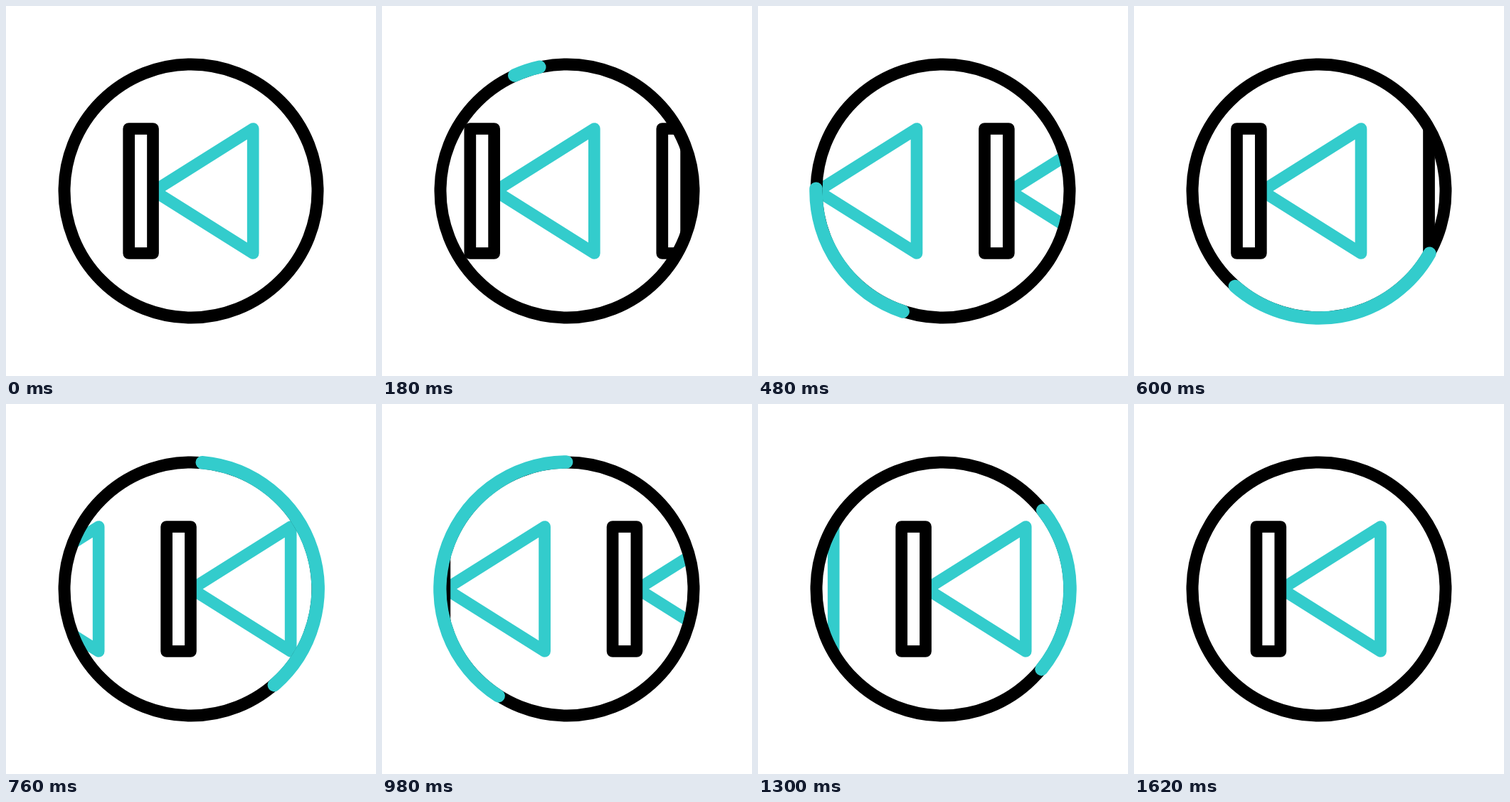
Recreate the animation shown at these times as an HTML page. Size 520x520 px, loop 2.42 s.

```html
<!DOCTYPE html>
<html lang="en">
<head>
<meta charset="utf-8">
<title>Previous track</title>
<style>
  html, body { margin: 0; width: 100%; height: 100%; overflow: hidden; background: #fff; }
  svg { display: block; width: 100%; height: 100%; }
</style>
</head>
<body>
<svg viewBox="0 0 520 520" fill="none" stroke-width="16.7" stroke-linejoin="round" stroke-linecap="round">
  <defs>
    <clipPath id="disc"><circle cx="260" cy="260" r="178"/></clipPath>
    <g id="icon">
      <path d="M347.2 172.5V347.5L208 260Z" stroke="#33cccc"/>
      <path d="M172.7 172.5H206.5V347.5H172.7Z" fill="#fff" stroke="#000"/>
    </g>
  </defs>
  <g clip-path="url(#disc)">
    <g id="strip">
      <use href="#icon" x="-270"/>
      <use href="#icon"/>
      <use href="#icon" x="270"/>
    </g>
  </g>
  <circle cx="260" cy="260" r="178" stroke="#000" stroke-width="17"/>
  <path id="arc" stroke="#33cccc" stroke-width="18.5"/>
</svg>
<script>
const LOOP = 2420, STEP = 20;
const GAP = 270, TRAVEL = 4 * GAP + 0.7;
const RADIUS = 178.5, TURN = 720;

const strip = document.getElementById('strip');
const arc = document.getElementById('arc');

// Cubic easing with flat ends; x1 and x2 are the horizontal handles.
function ease(x, x1, x2) {
  if (x <= 0) return 0;
  if (x >= 1) return 1;
  let lo = 0, hi = 1;
  for (let i = 0; i < 40; i++) {
    const s = (lo + hi) / 2, r = 1 - s;
    if (3 * x1 * s * r * r + 3 * x2 * s * s * r + s * s * s < x) lo = s;
    else hi = s;
  }
  return lo * lo * (3 - 2 * lo);
}

// Point on the ring, in degrees counter-clockwise from the top.
function onRing(deg) {
  const a = deg * Math.PI / 180;
  return (260 - RADIUS * Math.sin(a)).toFixed(3) + ' ' + (260 - RADIUS * Math.cos(a)).toFixed(3);
}

function draw(t) {
  const moved = TRAVEL * ease(t / 1600, 0.333, 0.3);
  const shift = Math.round(moved / GAP) * GAP - moved;
  strip.setAttribute('transform', `translate(${shift.toFixed(3)} 0)`);

  const head = TURN * ease(t / 1600, 0.35, 0.595);
  const tail = TURN * ease(t / 1580, 0.5, 0.82);
  arc.setAttribute('d', head - tail > 0.02
    ? `M${onRing(tail)}A${RADIUS} ${RADIUS} 0 0 0 ${onRing(head)}`
    : '');
}

const start = performance.now();
function tick() {
  const t = (performance.now() - start) % LOOP;
  draw(Math.floor(t / STEP) * STEP);
  requestAnimationFrame(tick);
}
draw(0);
requestAnimationFrame(tick);
</script>
</body>
</html>
```
